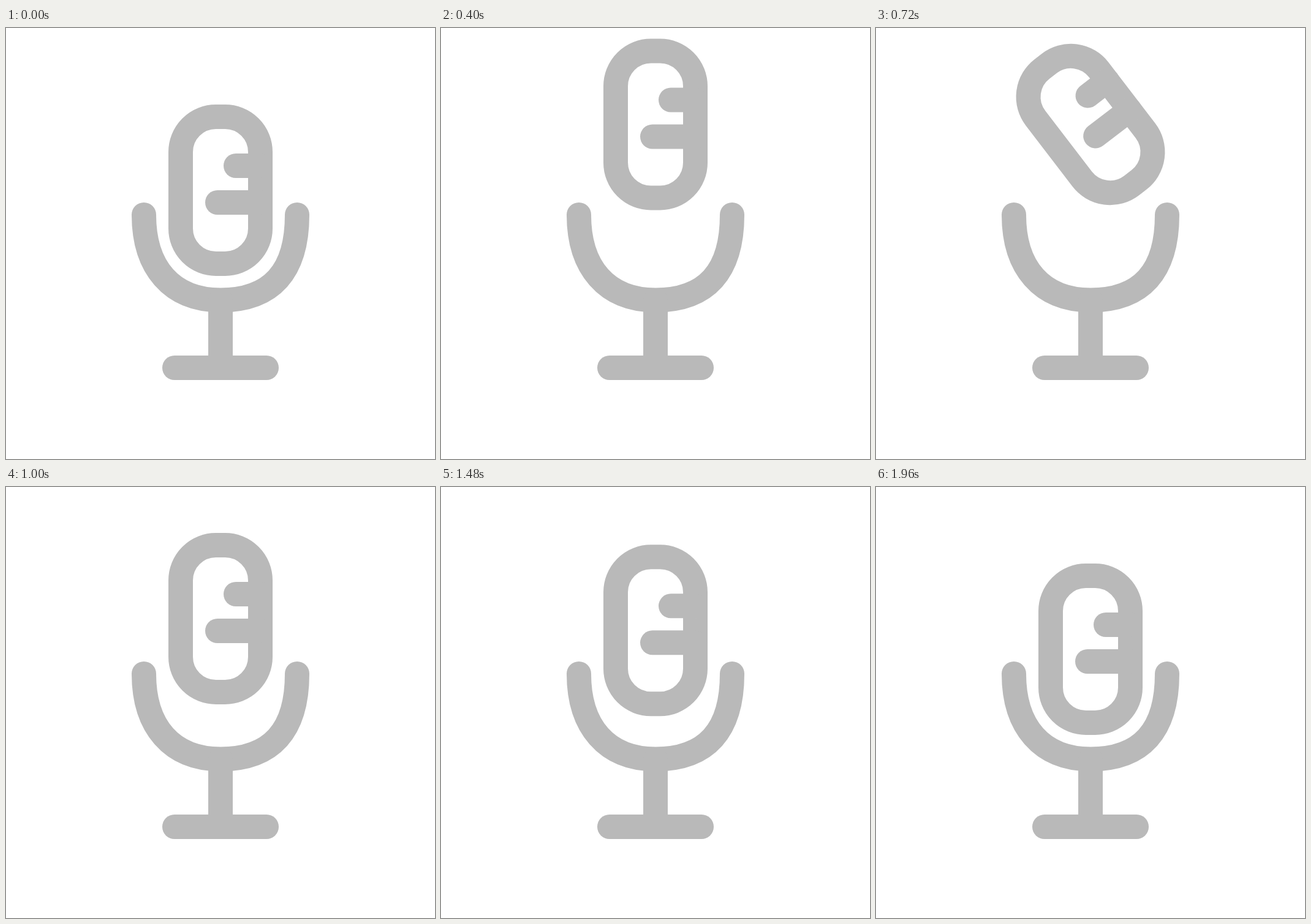
These frames come from a looping animation (700 px wide and 704 px high, 2000 ms). An HTML page with a canvas:

```html
<!DOCTYPE html>
<html lang="en">
<head>
<meta charset="utf-8">
<title>Microphone</title>
<style>
  html, body { margin: 0; width: 100%; height: 100%; overflow: hidden; background: #fff; }
  canvas { display: block; }
</style>
</head>
<body>
<canvas id="stage" width="700" height="704"></canvas>
<script>
const ctx = document.getElementById('stage').getContext('2d');
const LOOP = 2000;
const STEP = 40;
const CENTER = { x: 350, y: 265 };

// [time in ms, value]
const LIFT = [[0, 0], [400, -107.5], [800, -107.5], [1200, 7.5], [1600, -41.2], [1960, 0]];
const SPIN = [[400, 0], [800, 360]];

const smooth = u => u * u * (3 - 2 * u);

function valueAt(keys, t) {
  if (t <= keys[0][0]) return keys[0][1];
  for (let i = 1; i < keys.length; i++) {
    const [t0, a] = keys[i - 1];
    const [t1, b] = keys[i];
    if (t <= t1) return a + (b - a) * smooth((t - t0) / (t1 - t0));
  }
  return keys[keys.length - 1][1];
}

function line(x0, y0, x1, y1) {
  ctx.beginPath();
  ctx.moveTo(x0, y0);
  ctx.lineTo(x1, y1);
  ctx.stroke();
}

function drawStand() {
  // The cradle is slightly fuller on its right side.
  ctx.beginPath();
  ctx.moveTo(225, 305);
  ctx.bezierCurveTo(225, 391, 270, 444.5, 350, 444.5);
  ctx.quadraticCurveTo(475, 444.5, 475, 305);
  ctx.stroke();
  line(350, 445, 350, 555);
  line(275, 555, 425, 555);
}

function drawHead(lift, angle) {
  ctx.save();
  ctx.translate(CENTER.x, CENTER.y + lift);
  ctx.rotate(angle * Math.PI / 180);
  ctx.beginPath();
  ctx.roundRect(-65, -120, 130, 240, 57.5);
  ctx.stroke();
  line(25, -40, 65, -40);
  line(-5, 20, 65, 20);
  ctx.restore();
}

function draw(t) {
  ctx.fillStyle = '#fff';
  ctx.fillRect(0, 0, 700, 704);
  ctx.strokeStyle = '#b9b9b9';
  ctx.lineWidth = 40;
  ctx.lineCap = 'round';
  ctx.lineJoin = 'round';
  drawStand();
  drawHead(valueAt(LIFT, t), valueAt(SPIN, t));
}

const start = performance.now();

function tick() {
  const t = Math.max(0, performance.now() - start) % LOOP;
  draw(Math.floor(t / STEP) * STEP);
  requestAnimationFrame(tick);
}

tick();
</script>
</body>
</html>
```
